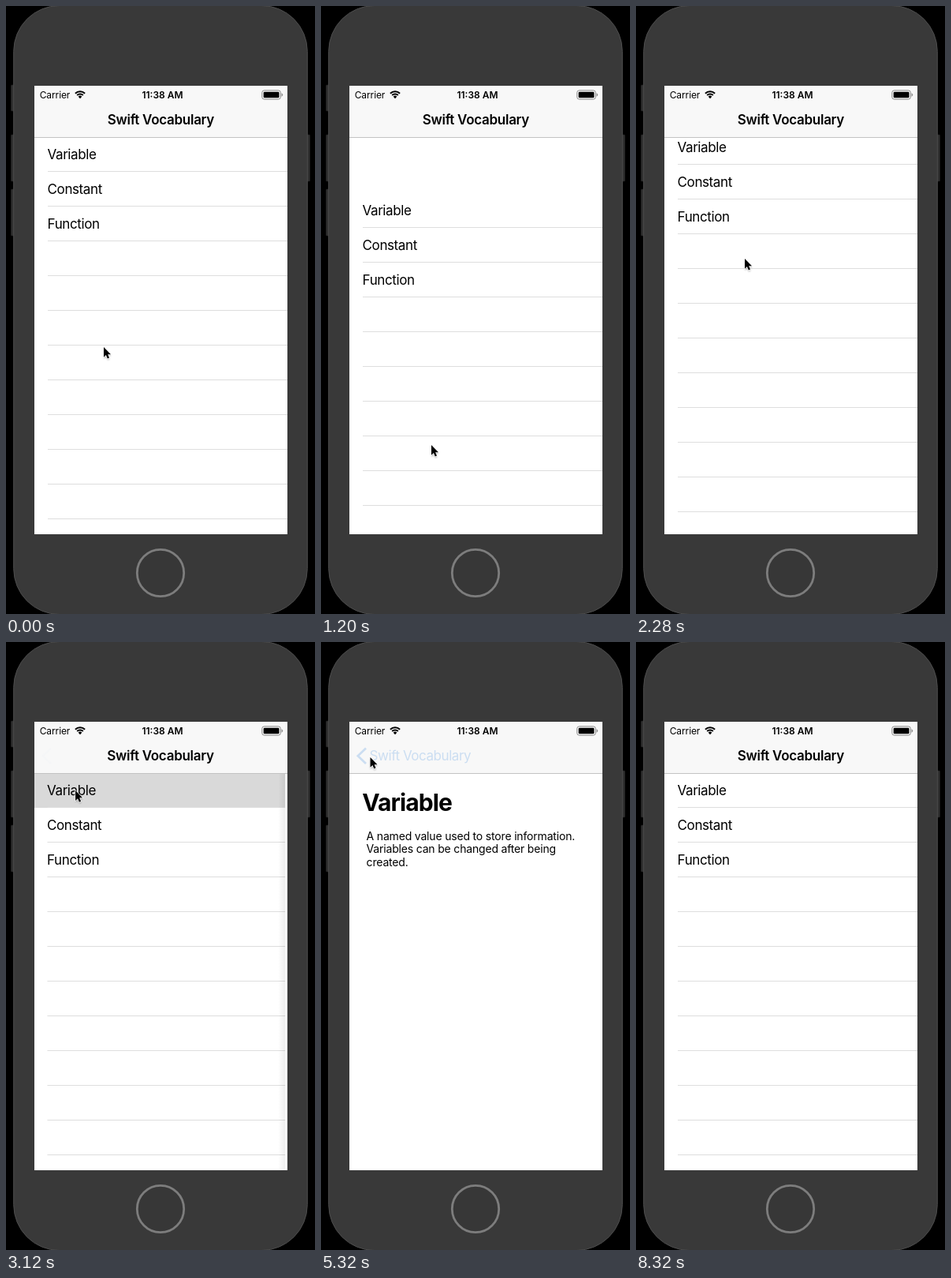
These frames come from a looping animation (392 by 770 pixels, 8440 ms). An HTML page:

```html
<!DOCTYPE html>
<html lang="en">
<head>
<meta charset="utf-8">
<title>Swift Vocabulary</title>
<style>
html, body { margin: 0; width: 100%; height: 100%; overflow: hidden; background: #000; }
svg { display: block; width: 100vw; height: 100vh; }
text { font-family: Inter, Roboto, "Liberation Sans", sans-serif; }
.row { font-size: 17px; letter-spacing: -0.4px; }
.title { font-size: 17px; font-weight: 600; letter-spacing: -0.28px; }
.link { font-size: 17px; letter-spacing: -0.45px; fill: #1c77d8; }
.status { font-size: 12px; }
.head { font-size: 30px; font-weight: 700; letter-spacing: -0.9px; }
.body { font-size: 14px; letter-spacing: -0.18px; }
</style>
</head>
<body>
<svg viewBox="0 0 392 770" xmlns="http://www.w3.org/2000/svg">
  <defs>
    <clipPath id="screen"><rect x="36" y="101" width="321" height="568"/></clipPath>
    <linearGradient id="edge">
      <stop offset="0" stop-color="#000" stop-opacity="0"/>
      <stop offset="1" stop-color="#000" stop-opacity=".07"/>
    </linearGradient>
    <filter id="soft" x="-50%" y="-50%" width="200%" height="200%"><feGaussianBlur stdDeviation="1"/></filter>
  </defs>

  <rect width="392" height="770" fill="#000"/>
  <g fill="#303030" stroke="#222" stroke-width=".6">
    <rect x="6.5" y="100" width="5" height="33" rx="1"/>
    <rect x="6.5" y="163" width="5" height="59" rx="1"/>
    <rect x="6.5" y="232" width="5" height="59" rx="1"/>
    <rect x="380.5" y="163" width="5" height="59" rx="1"/>
  </g>
  <rect x="9.7" y="-.5" width="372.6" height="771" rx="58" fill="#393939" stroke="#4d4d4d"/>
  <circle cx="196" cy="718" r="29.7" fill="#373737" stroke="#7d7d7d" stroke-width="2.8"/>

  <g clip-path="url(#screen)">
    <rect x="36" y="101" width="321" height="568" fill="#fff"/>
    <g id="list">
      <rect x="36" y="101" width="321" height="568" fill="#fff"/>
      <g id="rows">
        <rect id="mark" x="36" y="166" width="321" height="44" fill="#d9d9d9"/>
        <g id="lines"/>
      </g>
    </g>
    <rect id="dim" x="36" y="166" width="321" height="503"/>
    <g id="detail">
      <rect x="27" y="166" width="9" height="503" fill="url(#edge)"/>
      <rect x="36" y="166" width="321" height="503" fill="#fff"/>
      <text class="head" x="52.3" y="214">Variable</text>
      <text class="body" x="57.6" y="250.5">A named value used to store information.</text>
      <text class="body" x="57.6" y="267.3">Variables can be changed after being</text>
      <text class="body" x="57.6" y="284">created.</text>
    </g>

    <rect x="36" y="101" width="321" height="65" fill="#f8f8f8"/>
    <rect x="36" y="166" width="321" height="1" fill="#c3c3c3"/>
    <text class="status" x="42.7" y="116.6" letter-spacing="-.1">Carrier</text>
    <g fill="none" stroke="#000" stroke-width="2">
      <path d="M87.9 110.7A8.6 8.6 0 0 1 100.1 110.7"/>
      <path d="M90.2 113A5.4 5.4 0 0 1 97.8 113"/>
    </g>
    <path d="M94 117.2L91.7 114.7A3.2 3.2 0 0 1 96.3 114.7Z"/>
    <text class="status" x="198.5" y="116.6" text-anchor="middle" font-weight="600">11:38 AM</text>
    <rect x="324.8" y="106.9" width="23.6" height="11.2" rx="2.8" fill="none" stroke="#8a8a8a"/>
    <rect x="326.7" y="108.7" width="19.8" height="7.6" rx="1.2"/>
    <path d="M349.6 110.3Q351.2 111 351.2 112.5T349.6 114.7Z" fill="#8a8a8a"/>

    <text id="title" class="title" x="196.4" y="150" text-anchor="middle">Swift Vocabulary</text>
    <g id="back">
      <path d="M57 134.5L46.8 144.2L57 154" fill="none" stroke="#1c77d8" stroke-width="2.8"/>
      <text id="label" class="link" x="61.6" y="150">Swift Vocabulary</text>
    </g>
  </g>

  <g id="cursor">
    <path d="M0 1.5V15L3 12L5 16.4L7.3 15.4L5.4 11H9.5Z" opacity=".3" filter="url(#soft)"/>
    <path d="M0 0V12.8L2.9 10.1L4.8 14.6L7 13.6L5.1 9.2H9Z" stroke="#fff" stroke-width="1.4" paint-order="stroke"/>
  </g>
</svg>
<script>
const LOOP = 8440, STEP = 40;
const PUSH = 3114, DIM = 5320, POP = 5500, HIDE = 5900;
const $ = id => document.getElementById(id);

// [time, list offset]
const scroll = [[80, 0], [560, -18], [920, 0], [1200, 71], [1400, 88],
  [1840, 30], [2060, -15], [2280, -9], [2560, 0]];
// [time, x, y]
const pointer = [[80, 124, 432], [560, 128, 392], [920, 133, 425], [1200, 140, 556],
  [1400, 143, 590], [1840, 143, 470], [2060, 141, 385], [2280, 138, 320],
  [2640, 88, 191], [2800, 88, 191], [2840, 88, 188], [3100, 88, 188],
  [3400, 97, 201], [3960, 103, 225], [4020, 103, 225], [4360, 62.5, 146]];

// Smooth path through the keys that never overshoots them.
function along(keys, t, c) {
  const last = keys.length - 1;
  if (t <= keys[0][0]) return keys[0][c];
  if (t >= keys[last][0]) return keys[last][c];
  let i = 0;
  while (keys[i + 1][0] < t) i++;
  const slope = k => (keys[k + 1][c] - keys[k][c]) / (keys[k + 1][0] - keys[k][0]);
  const tangent = k => {
    if (k === 0 || k === last) return 0;
    const a = slope(k - 1), b = slope(k);
    return a * b > 0 ? 2 * a * b / (a + b) : 0;
  };
  const h = keys[i + 1][0] - keys[i][0], u = (t - keys[i][0]) / h;
  const a = keys[i][c], b = keys[i + 1][c], v = 1 - u;
  return a * (1 + 2 * u) * v * v + b * u * u * (3 - 2 * u)
    + h * (tangent(i) * u * v * v - tangent(i + 1) * u * u * v);
}

// Critically damped spring from 0 to 1.
function spring(ms) {
  if (ms <= 0) return 0;
  const x = 18.26 * ms / 1000;
  return x > 11 ? 1 : 1 - (1 + x) * Math.exp(-x);
}

function add(parent, name, attrs, content = "") {
  const el = document.createElementNS("http://www.w3.org/2000/svg", name);
  for (const key in attrs) el.setAttribute(key, attrs[key]);
  el.textContent = content;
  parent.appendChild(el);
}

for (let i = 0; i < 13; i++)
  add($("lines"), "rect", { x: 53, y: 209 + 44 * i, width: 304, height: 1, fill: "#dedede" });
["Variable", "Constant", "Function"].forEach((word, i) =>
  add($("rows"), "text", { class: "row", x: 52.6, y: 193.7 + 44 * i }, word));

const move = (id, x, y) => $(id).setAttribute("transform", `translate(${x.toFixed(2)} ${y.toFixed(2)})`);
const fade = (id, a) => $(id).setAttribute("opacity", a.toFixed(3));

function draw(t) {
  const popping = t >= POP;
  const p = popping ? 1 - spring(t - POP) : spring(t - PUSH);

  move("rows", 0, along(scroll, t, 1));
  move("list", -96 * p, 0);
  fade("lines", 1 - p);
  fade("mark", popping ? p : t >= PUSH ? 1 : 0);
  fade("dim", 0.1 * p);
  move("detail", 320 * (1 - p), 0);
  $("detail").style.display = p > 0 ? "" : "none";

  move("title", -67 * p, 0);
  fade("title", Math.max(0, 1 - 1.6 * p));
  move("label", 67 * (1 - p), 0);
  fade("back", t >= DIM && !popping ? 0.2 : p);

  move("cursor", along(pointer, t, 1), along(pointer, t, 2));
  $("cursor").style.display = t < HIDE ? "" : "none";
}

const start = performance.now();
function tick() {
  const t = (performance.now() - start) % LOOP;
  draw(Math.floor(t / STEP) * STEP);
  requestAnimationFrame(tick);
}
draw(0);
requestAnimationFrame(tick);
</script>
</body>
</html>
```
